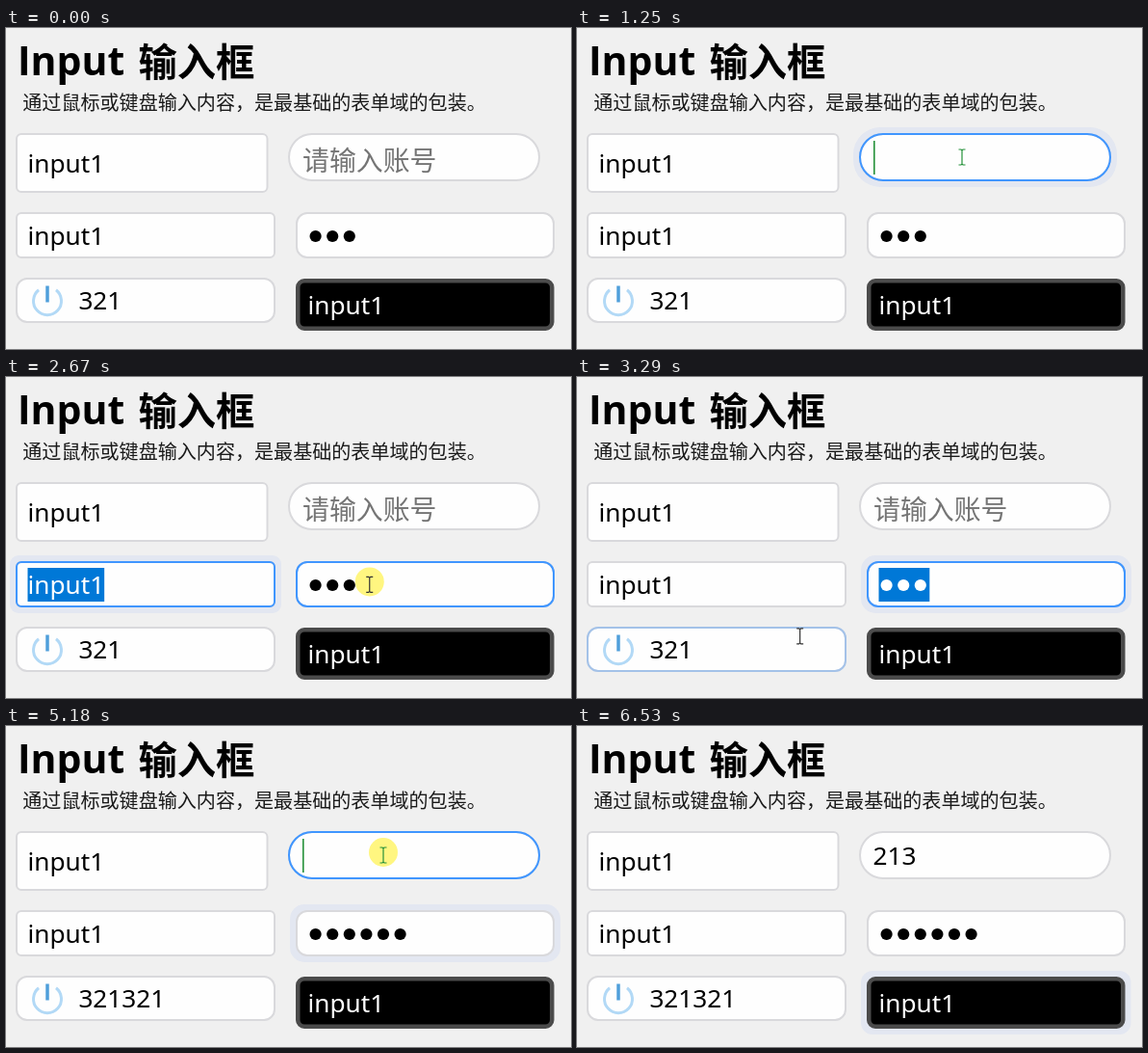
Write an HTML page that moves like this. It is 587 by 333 pixels and loops after 6.61 s.

```html
<!DOCTYPE html>
<html lang="zh">
<head>
<meta charset="utf-8">
<style>
html, body { margin: 0; width: 100%; height: 100%; overflow: hidden; background: #f0f0f0; }
svg { display: block; }
text { font: 26.2px "Noto Sans", sans-serif; }
.title { font: bold 41px "Open Sans", sans-serif; }
.zh { font-family: "Noto Sans CJK SC", "Noto Sans CJK", sans-serif; }
</style>
</head>
<body>
<svg id="stage" width="587" height="333" viewBox="0 0 587 333"></svg>
<script>
const LOOP = 6610, BLUE = '#4096ff';
const TRAVEL = 350, DRAG = 290, GLOW_LAG = 150, HOVER = 160;

const fields = [
  { x: 10, y: 109, w: 262.5, h: 62, r: 6, value: 'input1' },
  { x: 293, y: 109, w: 262, h: 50, r: 25, value: '', pad: 14.5, hint: '请输入账号', caret: '#25913a' },
  { x: 10, y: 191, w: 270, h: 48, r: 6, value: 'input1' },
  { x: 301, y: 191, w: 269, h: 48, r: 12, value: '...', secret: true },
  { x: 10, y: 259, w: 270, h: 47, r: 12, value: '321', pad: 65.4 },
  { x: 301, y: 260, w: 268.5, h: 54, r: 9, value: 'input1', dark: true, caret: '#fff' }
];

// each click: time, field, x; then typing or, after a delay, a drag to the left edge
const visits = [
  { at: 300, f: 0, x: 130 },
  { at: 860, f: 1, x: 400 },
  { at: 1760, f: 2, x: 245, drag: 60 },
  { at: 2700, f: 3, x: 385, drag: 60 },
  { at: 3420, f: 4, x: 200, type: '321', drag: 380 },
  { at: 4440, f: 3, x: 432, type: '...' },
  { at: 5080, f: 1, x: 392, type: '213' },
  { at: 5770, f: 5, x: 388 }
];
const enter = { x: 200, y: 205 }, leave = { at: 6440, x: 388, y: 360 };

const pen = document.createElement('canvas').getContext('2d');
pen.font = '26.2px "Noto Sans", sans-serif';

const unit = v => Math.min(1, Math.max(0, v));
const smooth = u => u * u * (3 - 2 * u);
const mix = (a, b, k) => ({ x: a.x + (b.x - a.x) * k, y: a.y + (b.y - a.y) * k });
const middle = f => f.y + f.h / 2;
const ramp = (t, start, end) => t < end ? unit((t - start) / 90) : 0;
const width = (f, s) => f.secret ? 17.6 * s.length : pen.measureText(s).width;

visits.forEach((v, i) => {
  v.end = (visits[i + 1] || leave).at;
  v.y = middle(fields[v.f]);
  v.rest = v.drag ? { x: fields[v.f].x + 2, y: fields[v.f].y + fields[v.f].h - 1 } : v;
});

const rect = (x, y, w, h, r, attrs) =>
  `<rect x="${x}" y="${y}" width="${w}" height="${h}" rx="${r}" ${attrs}/>`;
const zh = (x, y, s, size, style = '') =>
  `<text class="zh" x="${x}" y="${y}" style="font-size:${size}px;${style}">${s}</text>`;

function mouseAt(t) {
  const i = visits.findLastIndex(v => v.at <= t), v = visits[i], next = visits[i + 1] || leave;
  const trip = smooth(unit((t - next.at + TRAVEL) / TRAVEL));
  if (!v) return mix(enter, next, trip);
  const here = v.drag ? mix(v, v.rest, smooth(unit((t - v.at - v.drag) / DRAG))) : v;
  return mix(here, next, trip);
}

function valueAt(f, i, t) {
  return visits.filter(v => v.f === i && v.type).reduce((s, v) =>
    s + v.type.slice(0, Math.max(0, Math.floor((t - v.at - 30) / 100))), f.value);
}

function content(f, x, s, fill) {
  if (!f.secret) return `<text x="${x}" y="${middle(f) + 9.6}" fill="${fill}">${s}</text>`;
  return [...s].map((_, i) =>
    `<circle cx="${x + 8.1 + 17.6 * i}" cy="216" r="6.1" fill="${fill}"/>`).join('');
}

function drawField(f, i, t, mouse) {
  const own = visits.filter(v => v.f === i);
  const edge = Math.max(...own.map(v => ramp(t, v.at - HOVER, v.end)));
  const glow = Math.max(...own.map(v => ramp(t, v.at + GLOW_LAG, v.end + GLOW_LAG)));
  const b = f.dark ? 4.5 : 2;
  const frame = attrs => rect(f.x + b / 2, f.y + b / 2, f.w - b, f.h - b, f.r - b / 2, `stroke-width="${b}" ${attrs}`);
  let out = rect(f.x - 6, f.y - 6, f.w + 12, f.h + 12, f.r + 3, `fill="#e3e7f1" opacity="${glow}"`) +
    frame(f.dark ? 'fill="#000" stroke="#4b4b4b"' : 'fill="#fefefe" stroke="#d9d9dc"') +
    frame(`fill="none" stroke="${BLUE}" opacity="${edge}"`);

  const value = valueAt(f, i, t), x = f.x + (f.pad || 12.5), end = x + width(f, value);
  const focus = own.find(v => t >= v.at && t < v.end);
  out += content(f, x, value, f.dark ? '#fff' : '#000');
  if (f.hint && !value && !focus) out += zh(x + 0.5, 148, f.hint, 27.9, 'fill:#757575');
  if (!focus) return out;

  const top = middle(f) - 17;
  const left = focus.drag && t > focus.at + focus.drag
    ? t > focus.at + focus.drag + DRAG ? x : Math.min(end, Math.max(x, mouse.x)) : end;
  if (left >= end) return out + rect(end + 0.5, top, 1.6, 35, 0, `fill="${f.caret || '#000'}"`);
  const w = end - left;
  return out + rect(left, top, w, 35, 0, 'fill="#0078d7"') +
    `<svg x="${left}" y="${top}" width="${w}" height="35" viewBox="${left} ${top} ${w} 35">${content(f, x, value, '#fff')}</svg>`;
}

function drawMouse(t, { x, y }) {
  if (t < 70) return '';
  const over = fields.find(f => x > f.x + 3 && x < f.x + f.w && y > f.y && y < f.y + f.h);
  const pressed = visits.some(v => {
    const since = t - v.at, pull = since - v.drag;
    return since > -40 && since < 150 || pull >= 0 && pull < DRAG;
  });
  const shape = (d, attrs) => `<path d="${d}" transform="translate(${x} ${y})" ${attrs}/>`;
  let out = pressed ? `<circle cx="${x}" cy="${y - 3}" r="15" fill="#ffee14" opacity=".54"/>` : '';
  if (!over)
    out += shape('M0 0V19.5L5.5 14.5L14 13.5Z', 'fill="#fff" stroke="#111" stroke-width="1.5" stroke-linejoin="round"');
  else if (!over.dark)
    out += shape('M-3.5-8H-1L0-7L1-8H3.5M0-7V7M-3.5 8H-1L0 7L1 8H3.5',
      `fill="none" stroke="${over.caret || '#333'}" stroke-width="1.2"`);
  return out;
}

const heading = '<text class="title" x="12" y="49">Input</text>' +
  zh(137.5, 49.5, '输入框', 40.3, 'font-weight:700') +
  zh(17.3, 84.5, '通过鼠标或键盘输入内容，是最基础的表单域的包装。', 20.07, 'fill:#1a1a1a');
const power = '<path d="M34 271.8A14.5 14.5 0 1 0 52 271.8" fill="none" stroke="#b2d9f6" stroke-width="3"/>' +
  '<path d="M43 267.5V284.5" stroke="#4f9fdb" stroke-width="3.5"/>';

const stage = document.getElementById('stage');
function draw(now) {
  const t = now % LOOP, mouse = mouseAt(t);
  stage.innerHTML = heading + fields.map((f, i) => drawField(f, i, t, mouse)).join('') + power + drawMouse(t, mouse);
  requestAnimationFrame(draw);
}
draw(0);
</script>
</body>
</html>
```
